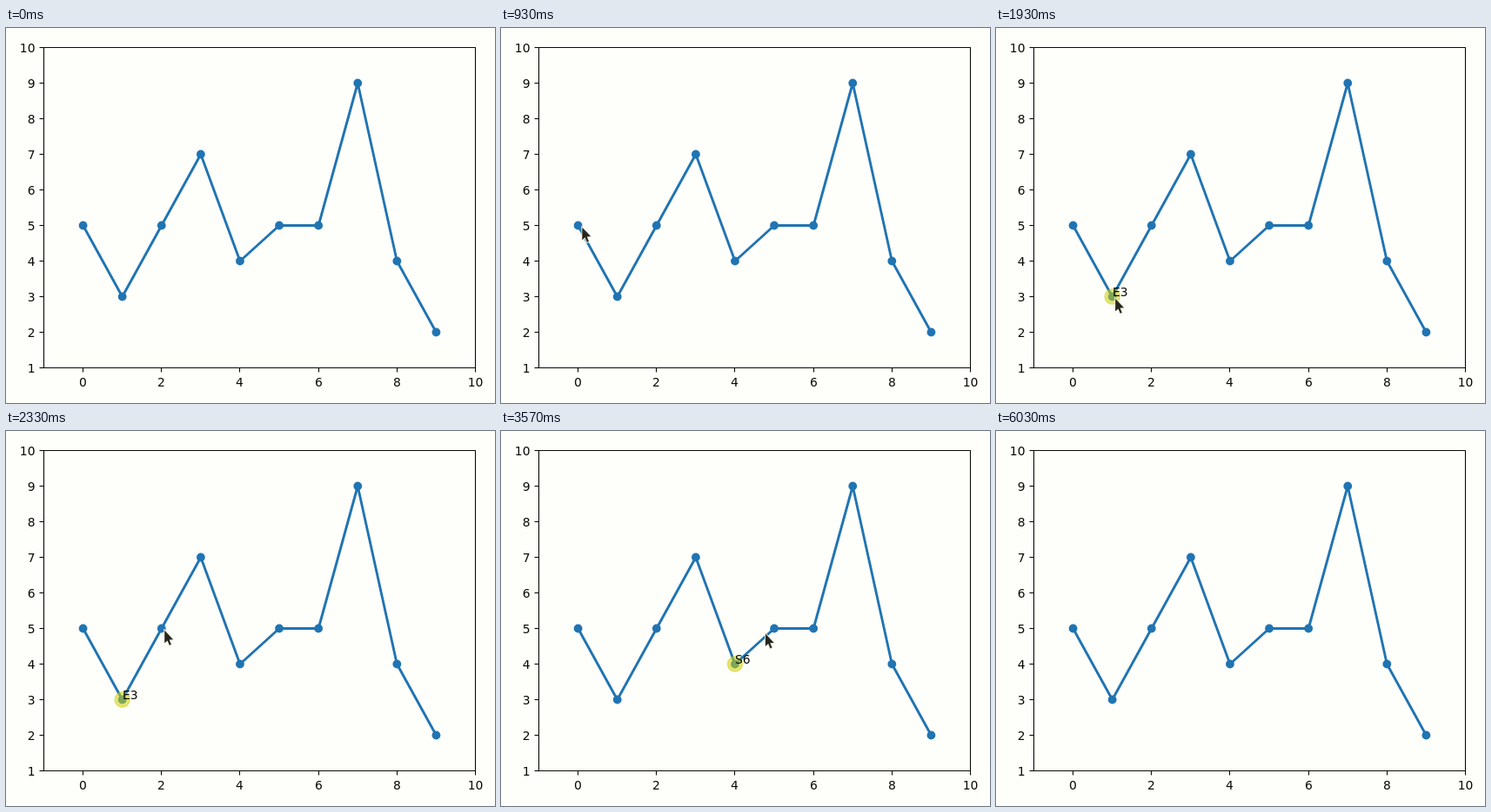
Animation of 562 by 432 pixels, one loop 6760 ms. Source, as an HTML page with a canvas:

```html
<!DOCTYPE html>
<html lang="en">
<head>
<meta charset="utf-8">
<title>Hover labels on a line chart</title>
<style>
html, body { margin: 0; width: 100%; height: 100%; overflow: hidden; background: #fefefb; }
canvas { display: block; }
</style>
</head>
<body>
<canvas id="stage" width="562" height="432"></canvas>
<script>
const ctx = document.getElementById('stage').getContext('2d');
const LOOP = 6760;
const INK = '#0a0a05', BLUE = '#2074b2', PAPER = '#fefefb';
const plot = { left: 43.5, top: 22.5, right: 539.5, bottom: 391.5 };
const values = [5, 3, 5, 7, 4, 5, 5, 9, 4, 2];

const px = x => plot.left + (x + 1) * (plot.right - plot.left) / 11;
const py = y => plot.bottom - (y - 1) * (plot.bottom - plot.top) / 9;
const crisp = v => Math.floor(v) + 0.5;

const easeOut = k => 1 - (1 - k) ** 2;
const smooth = k => k * k * (3 - 2 * k);
const linear = k => k;

// The pointer visits these points, resting a little off each centre.
const PICK_DELAY = 40, UNPICK = 4470;
const visits = [
  { point: 0, label: 'A2', arrive: 980, leave: 1300 },
  { point: 1, label: 'E3', arrive: 1890, leave: 2080 },
  { point: 2, label: 'H4', arrive: 2330, leave: 2850 },
  { point: 4, label: 'S6', arrive: 3200, leave: 3400 },
  { point: 5, label: 'T7', arrive: 3633, leave: 5800, nudge: -4, pick: 4070 }
].map(({ nudge = 3, ...v }) => ({
  ...v,
  pick: v.pick ?? v.arrive + PICK_DELAY,
  x: px(v.point) + nudge,
  y: py(values[v.point]) + nudge * 0.6,
  ease: v.point ? smooth : easeOut
}));
const route = [
  { x: 562, y: 184, arrive: 30, leave: 30 },
  ...visits,
  { x: 566, y: 104, arrive: 6030, leave: 6030, ease: linear }
];

function line(x1, y1, x2, y2) {
  ctx.beginPath();
  ctx.moveTo(x1, y1);
  ctx.lineTo(x2, y2);
  ctx.stroke();
}

function dot(x, y, r, color) {
  ctx.fillStyle = color;
  ctx.beginPath();
  ctx.arc(x, y, r, 0, Math.PI * 2);
  ctx.fill();
}

function text(str, x, y, align) {
  ctx.fillStyle = INK;
  ctx.textAlign = align;
  ctx.fillText(str, x, y);
}

function drawAxes() {
  ctx.strokeStyle = INK;
  ctx.lineWidth = 1.1;
  ctx.strokeRect(plot.left, plot.top, plot.right - plot.left, plot.bottom - plot.top);
  for (let x = 0; x <= 10; x += 2) {
    const at = crisp(px(x));
    line(at, plot.bottom, at, plot.bottom + 5);
    text(x, at, 412.5, 'center');
  }
  for (let y = 1; y <= 10; y++) {
    const at = crisp(py(y));
    line(plot.left - 5, at, plot.left, at);
    text(y, 33.5, at + 5.5, 'right');
  }
}

function drawSeries() {
  ctx.strokeStyle = BLUE;
  ctx.lineWidth = 2.9;
  ctx.lineJoin = 'round';
  ctx.beginPath();
  values.forEach((v, i) => ctx.lineTo(px(i), py(v)));
  ctx.stroke();
  values.forEach((v, i) => dot(px(i), py(v), 4.9, BLUE));
}

function drawPick(t) {
  const picked = visits.filter(v => v.pick <= t).pop();
  if (!picked || t >= UNPICK) return;
  const x = px(picked.point), y = py(values[picked.point]);
  dot(x, y, 8.6, 'rgba(205, 208, 10, 0.55)');
  ctx.strokeStyle = 'rgba(205, 208, 10, 0.45)';
  ctx.lineWidth = 1.6;
  ctx.stroke();
  text(picked.label, Math.round(x), Math.floor(y), 'left');
}

function pointerAt(t) {
  const i = route.findIndex(stop => t < stop.leave);
  if (i < 1) return null;
  const from = route[i - 1], to = route[i];
  const k = to.ease(Math.min(1, (t - from.leave) / (to.arrive - from.leave)));
  return { x: from.x + (to.x - from.x) * k, y: from.y + (to.y - from.y) * k };
}

function drawPointer(t) {
  const at = pointerAt(t);
  if (!at) return;
  ctx.save();
  ctx.translate(at.x + 0.5, at.y + 0.5);
  const shape = new Path2D('M0 0V14.5L3.3 11.6L5.6 17L7.6 16.1L5.4 10.8L9.8 10.4Z');
  ctx.lineJoin = 'miter';
  ctx.lineWidth = 1.8;
  ctx.strokeStyle = '#f4f4e8';
  ctx.stroke(shape);
  ctx.fillStyle = '#26261c';
  ctx.fill(shape);
  ctx.restore();
}

function draw(now) {
  const t = now % LOOP;
  ctx.fillStyle = PAPER;
  ctx.fillRect(0, 0, 562, 432);
  ctx.font = '13.89px "DejaVu Sans", sans-serif';
  drawAxes();
  drawSeries();
  drawPick(t);
  drawPointer(t);
}

const start = performance.now();
function tick() {
  draw(performance.now() - start);
  requestAnimationFrame(tick);
}
tick();
</script>
</body>
</html>
```
